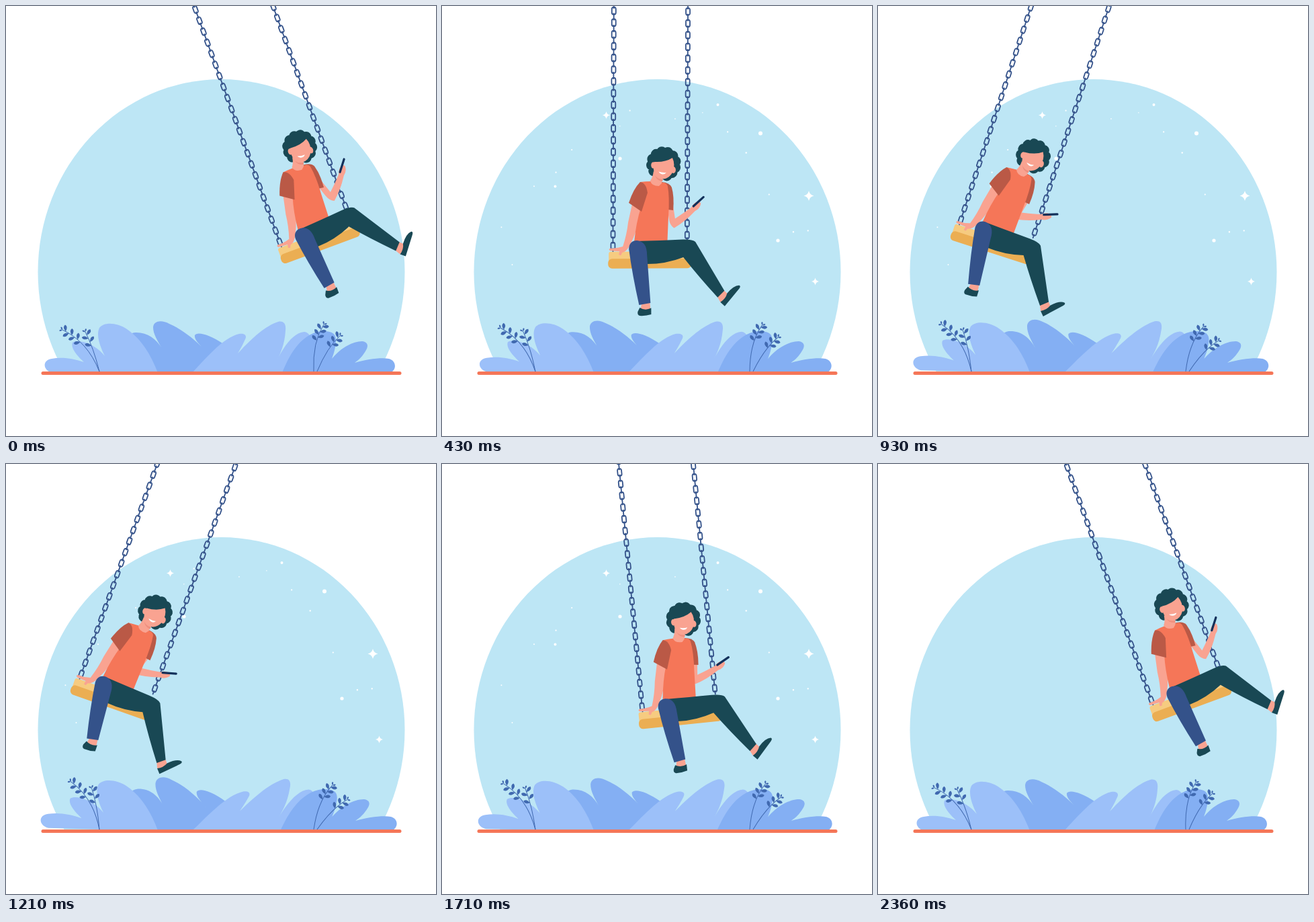
Animation, 640 px wide and 640 px high, one loop 2.43 s. Source, as an HTML page:

```html
<!DOCTYPE html>
<html lang="en">
<head>
<meta charset="utf-8">
<title>Swing</title>
<style>
  html, body { margin: 0; width: 100%; height: 100%; overflow: hidden; background: #fff; }
  svg { display: block; width: 100%; height: 100%; }
  .sky { fill: #bde6f5; }
  .light { fill: #9cc0f9; }
  .mid { fill: #84aff3; }
  .coral { fill: #f57658; }
  .rust { fill: #ba5946; }
  .skin { fill: #f9a391; }
  .dark { fill: #194854; }
  .jeans { fill: #34528a; }
  .twig { fill: #4069b0; }
  .stem { fill: none; stroke: #4069b0; }
  .chain { fill: none; stroke: #34528a; stroke-width: 1.8; stroke-linecap: round; }
</style>
</head>
<body>
<svg viewBox="0 0 640 640">
  <defs><clipPath id="above"><rect width="640" height="546"/></clipPath></defs>

  <g clip-path="url(#above)">
    <ellipse class="sky" cx="320.5" cy="396" rx="273" ry="287"/>
    <path id="stars" fill="#fff"/>

    <path id="bushMid" class="mid" d="M170 546 C172 510 178 487 192 486 C212 485 226 497 236 516 C226 499 219 489 219 478 C220 468 232 467 243 473 C262 481 282 497 297 513 C287 503 280 496 281 490 C284 485 300 487 325 504 L352 546Z"/>
    <path id="bushCentre" class="light" d="M277 546 C298 524 322 494 347 488 C355 487 359 490 356 496 C352 505 349 510 345 517 C360 501 383 477 405 470 C414 468 417 474 416 483 C415 500 411 512 404 526 C414 506 428 486 444 485 C454 486 460 500 460 546Z"/>
    <path id="bushRight" class="mid" d="M411 546 C422 518 440 487 470 484 C487 483 492 489 491 500 C490 510 488 517 485 525 C497 510 515 499 530 499 C538 500 540 505 536 512 C531 521 526 526 519 531 C537 526 557 523 570 525 C581 528 582 541 572 546Z"/>
    <path id="bushLeft" class="light" d="M69 546 C54 542 54 527 68 525 C84 522 101 525 116 530 C104 519 96 508 99 501 C108 495 133 503 147 521 C139 505 134 489 139 479 C146 470 165 471 180 481 C202 496 216 520 226 546Z"/>
    <g id="twigs" class="twig"></g>
  </g>
  <rect class="coral" x="52.5" y="544" width="536" height="5" rx="2.5"/>

  <g id="swing">
    <path id="chains" class="chain"/>
    <rect x="247" y="365.5" width="122" height="20" rx="3" fill="#f6cb80"/>
    <rect x="246" y="376" width="124" height="14.5" rx="6" fill="#ebae53"/>

    <g id="arm">
      <path class="skin" d="M333 290 L342 290 L345 317 Q360 308 370 301 Q373 295 379 293 Q385 293 384 297 Q382 304 375 307 Q360 322 343 331 Q337 327 336 318Z"/>
      <path d="M373 299.5 L388.5 286.5" stroke="#12305a" stroke-width="3.2" stroke-linecap="round"/>
    </g>
    <path class="rust" d="M326 262 Q338 263 341 270 Q345 284 343 304 L335 303Z"/>
    <path class="skin" d="M282 295 L297 300 Q290 335 278 357 Q273 366 267 367 L265 371 L262 370 L263 365 L249 364 Q246 362 249 360.5 Q259 361 268 358 Q274 340 276 322Z"/>
    <path class="coral" d="M294 262 Q302 261 309 261 Q318 265 325 263 Q333 262 335 268 Q338 285 336 312 L334 358 L286 358 L285 350 Q288 322 295 300Z"/>
    <path class="rust" d="M294 262 Q303 263 305 278 L296 306 L277 293 Q284 272 294 262Z"/>

    <g id="head">
      <path class="dark" id="hair"/>
      <path class="skin" d="M314 246 Q313 255 309 260 Q311 268 322 268 L326 264 L328 252Z"/>
      <path d="M316 252 Q320 258 328 258 L327 261 Q319 260 316 252Z" fill="#ee8f7e"/>
      <ellipse class="skin" cx="313.7" cy="237" rx="3.4" ry="4.8"/>
      <ellipse class="skin" cx="343.5" cy="244" rx="3.5" ry="5"/>
      <path class="skin" d="M315 232 Q331 233 342 226 Q347 236 342 248 Q336 258 326 257.5 Q315 256 314 243Z"/>
      <path d="M321.5 246.5 Q327 248.5 333 247.8 Q330 251.8 325.5 250 Q323 249 321.5 246.5Z" fill="#fff"/>
    </g>

    <g id="legRight">
      <path class="skin" d="M408 432 L418 423 L423 428 L421 436 L413 441Z"/>
      <path class="dark" d="M413 441 Q421 436 423 428 Q433 416 441 416 Q444 417 441 421 L419.5 447Z"/>
      <path class="dark" d="M286 350 Q325 349 357 347.5 Q372 347 376 351 L419 424 L409 434 Q380 402 358 374 Q332 384 304 384 L288 376Z"/>
    </g>
    <g id="legLeft">
      <path class="skin" d="M296 442 L308 441 L309 452 L294 452Z"/>
      <path class="dark" d="M293 449 Q301 454 310 449.5 L310 459 Q302 461.5 293 461 Q289 460 290 455Z"/>
      <path class="jeans" d="M277 362 C277 353 282 349 289 349 C299 350 304 357 304 371 L309 442 L292 445 Q282 400 277 362Z"/>
    </g>
  </g>
</svg>

<script>
const $ = id => document.getElementById(id);
const circle = (x, y, r) => `M${x - r} ${y}a${r} ${r} 0 1 0 ${2 * r} 0a${r} ${r} 0 1 0 ${-2 * r} 0`;

// Stars: a few bright ones, the small ones scattered by a seeded generator
function sparkle(x, y, r) {
  const q = r * .18;
  return `M${x} ${y - r}Q${x + q} ${y - q} ${x + r} ${y}Q${x + q} ${y + q} ${x} ${y + r}` +
         `Q${x - q} ${y + q} ${x - r} ${y}Q${x - q} ${y - q} ${x} ${y - r}`;
}
let seed = 11;
const random = () => (seed = seed * 16807 % 2147483647) / 2147483647;
function starPath() {
  let d = sparkle(244.5, 162.5, 5.5) + sparkle(546, 282.5, 7.5) + sparkle(555.5, 410, 5.5);
  d += circle(474, 189.5, 3) + circle(500, 349, 2.6) + circle(265, 227, 2.6);
  d += circle(410.5, 147, 2) + circle(168.5, 268.5, 2);
  for (let n = 0; n < 14; n++) {
    const a = Math.PI * (1 + (n + random()) / 14), far = .7 + .2 * random();
    d += circle(320 + 273 * far * Math.cos(a), 385 + 275 * far * Math.sin(a), .7 + .6 * random());
  }
  return d;
}
$('stars').setAttribute('d', starPath());

// Hair: curls set along an arc from the left ear over the top to the nape
function hairPath() {
  let d = circle(329, 234, 19);
  for (let deg = -215; deg <= 75; deg += 29) {
    const a = deg * Math.PI / 180;
    d += circle(329 + 18 * Math.cos(a), 235 + 18 * Math.sin(a), 8);
  }
  return d;
}
$('hair').setAttribute('d', hairPath());

// Chains hang upward from their lowest link, leaning slightly
const PITCH = 17.5, LEAN = .0065;
function chainPath(x, y) {
  let d = `M${x} ${y + 4}v5`;
  for (let k = 0; k < 26; k++) {
    const cx = x + LEAN * PITCH * k, cy = y - PITCH * k;
    d += `M${cx - 3} ${cy - 2.5}a3 3 0 0 1 6 0v5a3 3 0 0 1 -6 0z`;
    d += `M${cx} ${cy - 4}V${cy - PITCH + 4}`;
  }
  return d;
}
$('chains').setAttribute('d', chainPath(253.3, 357) + chainPath(363.7, 341));

// Twigs: a curved stem with leaves on alternating sides and a forked tip
function leaf(x, y, a, len) {
  const at = (r, turn) => `${x + r * Math.cos(a + turn)} ${y + r * Math.sin(a + turn)}`;
  return `M${x} ${y}Q${at(len * .85, .6)} ${at(len, 0)}Q${at(len * .85, -.6)} ${x} ${y}`;
}
function addTwig(id, [x0, y0], [x1, y1], [x2, y2], count) {
  let d = '';
  for (let n = 0; n <= count; n++) {
    const t = .6 + .4 * n / count, u = 1 - t;
    const x = u * u * x0 + 2 * u * t * x1 + t * t * x2;
    const y = u * u * y0 + 2 * u * t * y1 + t * t * y2;
    const a = Math.atan2(u * (y1 - y0) + t * (y2 - y1), u * (x1 - x0) + t * (x2 - x1));
    if (n < count) d += leaf(x, y, a + (n % 2 ? 1 : -1), 10);
    else d += leaf(x, y, a + .7, 5) + leaf(x, y, a - .7, 5);
  }
  $('twigs').innerHTML += `<g id="${id}"><path class="stem" d="M${x0} ${y0}Q${x1} ${y1} ${x2} ${y2}"/>` +
                          `<path d="${d}"/></g>`;
}
addTwig('twigA', [139, 544], [121, 499], [84, 482], 6);
addTwig('twigB', [139, 544], [130, 508], [118, 485], 4);
addTwig('twigC', [458, 544], [456, 500], [473, 474], 6);
addTwig('twigD', [463, 544], [478, 508], [497, 491], 5);

// Motion
const FPS = 14, STEPS = 34, HALF = STEPS / 2, LOOP = 2430;
const REACH = 19.9;

// Ease like cubic-bezier(x1, 0, x2, 1)
function ease(x1, x2, x) {
  let lo = 0, hi = 1, s = .5;
  for (let n = 0; n < 30; n++) {
    s = (lo + hi) / 2;
    const v = 3 * x1 * s * (1 - s) ** 2 + 3 * x2 * s * s * (1 - s) + s ** 3;
    if (v < x) lo = s; else hi = s;
  }
  return s * s * (3 - 2 * s);
}
const swingAngle = i => i < HALF
  ? REACH - 2 * REACH * ease(.33, .27, i / HALF)
  : 2 * REACH * ease(.4, .2, i / HALF - 1) - REACH;

const clamp = v => Math.max(0, Math.min(1, v));
const turn = (id, deg, x, y) => $(id).setAttribute('transform', `rotate(${deg} ${x} ${y})`);

// Bushes turn, lean and stretch about a point on the ground
function bend(id, x, deg, lean, wide, tall) {
  $(id).setAttribute('transform', `translate(${x} 544) rotate(${deg}) skewX(${-lean}) ` +
    `scale(${1 + wide} ${1 + tall}) translate(${-x} -544)`);
}

function draw(ms) {
  const i = Math.min(STEPS - 1, Math.floor((ms + 5) * FPS / 1000));
  const sway = (1 - Math.cos(2 * Math.PI * i / STEPS)) / 2;

  turn('swing', -swingAngle(i) - .4, 313, -76);
  turn('arm', -12.3 + 37 * sway, 334, 293);
  turn('head', 2.8 - 9.5 * sway, 318, 258);
  turn('legRight', -2 + 7.4 * sway, 292, 380);
  turn('legLeft', .3 - sway, 290, 362);

  turn('twigA', 10.8 * sway, 139, 544);
  turn('twigB', 9 * sway, 139, 544);
  turn('twigC', 10.8 * sway, 458, 544);
  turn('twigD', 12.5 * sway, 463, 544);

  bend('bushLeft', 215, 1.6 * sway, 0, .04 * sway, 0);
  bend('bushMid', 250, 0, 2.9 * sway, 0, .04 * sway);
  bend('bushCentre', 340, 0, 6 * sway, 0, .01 * sway);
  bend('bushRight', 500, 0, 2.3 * sway, .03 * sway, 0);

  $('stars').setAttribute('opacity', Math.min(clamp(i / 5), clamp((32 - i) / 3)));
}

const start = performance.now();
function tick() {
  draw((performance.now() - start) % LOOP);
  requestAnimationFrame(tick);
}
tick();
</script>
</body>
</html>
```
